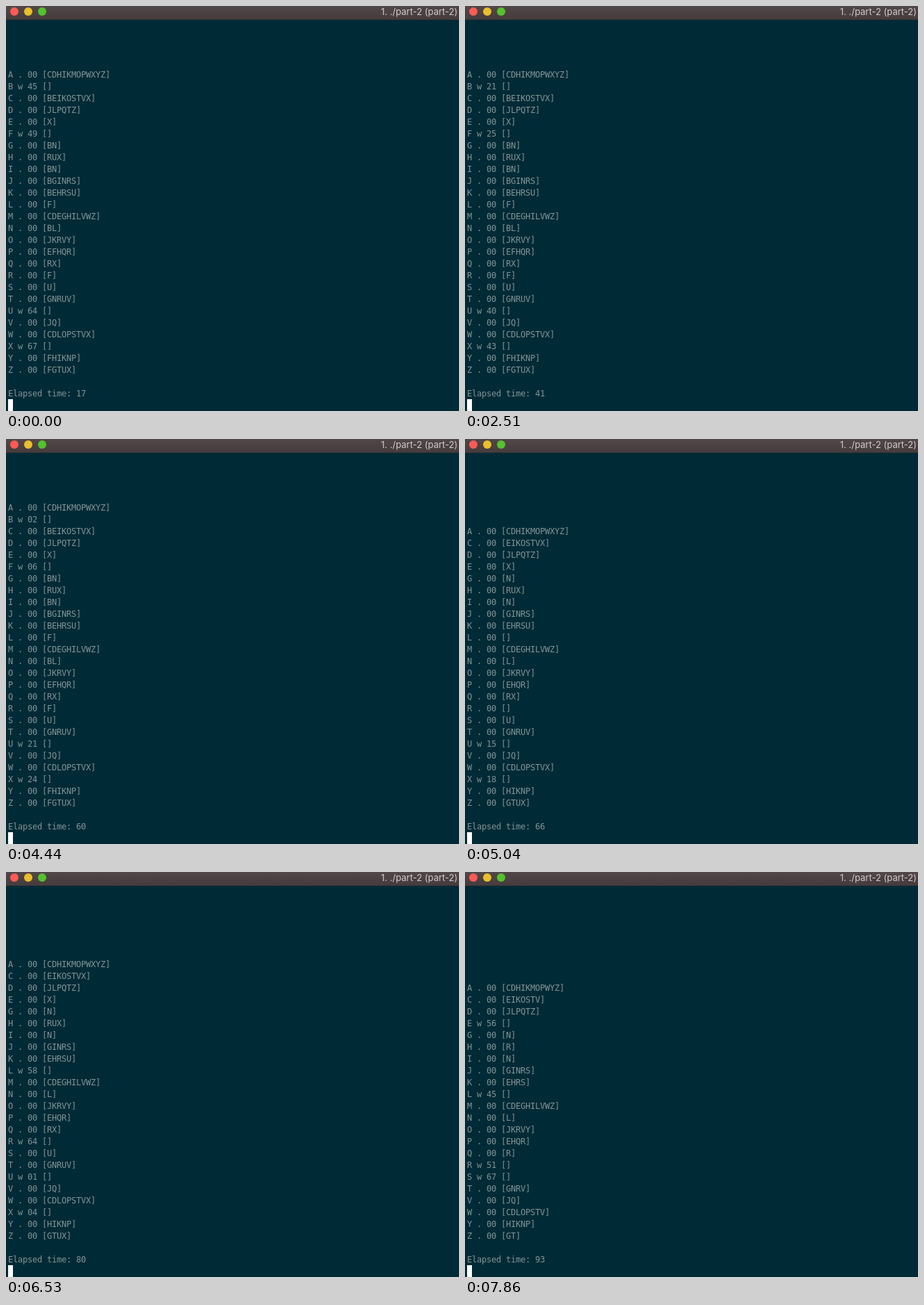
These frames come from a looping animation (652 px wide and 583 px high, 8 s). An HTML page with a canvas:

```html
<!DOCTYPE html>
<html lang="en">
<head>
<meta charset="utf-8">
<title>Terminal</title>
<style>
  html, body { margin: 0; width: 100%; height: 100%; overflow: hidden; background: #002b36; }
  canvas { display: block; }
</style>
</head>
<body>
<canvas id="stage" width="652" height="583"></canvas>
<script>
const ctx = document.getElementById('stage').getContext('2d');
const LOOP = 8000;
const CELL = 7, LINE = 17, LEFT = 3;
const LAST_TASK_Y = 528, STATUS_Y = 562;

// Prerequisites of each task, A to Z
const needs = Object.fromEntries(
  ('CDHIKMOPWXYZ,,BEIKOSTVX,JLPQTZ,X,,BN,RUX,BN,BGINRS,BEHRSU,F,CDEGHILVWZ,' +
   'BL,JKRVY,EFHQR,RX,F,U,GNRUV,,JQ,CDLOPSTVX,,FHIKNP,FGTUX')
    .split(',').map((list, i) => [String.fromCharCode(65 + i), list]));

// A task is ready once its prerequisites end; it then takes 61 ticks plus its index
const tasks = {};
function schedule(id) {
  if (!tasks[id]) {
    const ready = Math.max(0, ...[...needs[id]].map(n => schedule(n).end));
    tasks[id] = { ready, end: ready + 61 + id.charCodeAt(0) - 65 };
  }
  return tasks[id];
}
Object.keys(needs).forEach(schedule);

// The screen refreshes more slowly than the scheduler ticks
const shortSteps = new Set([0, 4, 8, 14, 20, 27, 36, 45, 50, 53]);
const refreshes = [0];
for (let k = 0; k < 53; k++) refreshes.push(refreshes[k] + (shortSteps.has(k) ? 140 : 150));

function tickAt(time) {
  const shown = refreshes.findLast(r => r <= time);
  return 17 + Math.floor((shown + 45) / 103.2);
}

function taskLine(id, tick) {
  const { ready, end } = tasks[id];
  const working = tick > ready;
  const left = String(working ? end - tick : 0).padStart(2, '0');
  const waiting = [...needs[id]].filter(n => tasks[n].end > tick).join('');
  return `${id} ${working ? 'w' : '.'} ${left} [${waiting}]`;
}

function print(text, y) {
  [...text].forEach((ch, i) => ctx.fillText(ch, LEFT + i * CELL, y));
}

function titleBar() {
  const shade = ctx.createLinearGradient(0, 0, 0, 20);
  shade.addColorStop(0, '#524748');
  shade.addColorStop(1, '#453b3c');
  ctx.fillStyle = shade;
  ctx.fillRect(0, 0, 652, 20);
  ctx.fillStyle = '#3a3638';
  ctx.fillRect(0, 19, 652, 1);
  ['#fc5b55', '#e9bf2a', '#54c22c'].forEach((color, i) => {
    ctx.fillStyle = color;
    ctx.beginPath();
    ctx.arc(12 + i * 20, 8, 6, 0, Math.PI * 2);
    ctx.fill();
  });
  ctx.font = '13px Inter, Roboto, sans-serif';
  ctx.textAlign = 'right';
  ctx.fillStyle = '#d0cbcb';
  ctx.fillText('1. ./part-2 (part-2)', 650, 13);
}

function draw(time) {
  const tick = tickAt(time);
  ctx.fillStyle = '#002b36';
  ctx.fillRect(0, 0, 652, 583);
  titleBar();

  ctx.font = '12px "DejaVu Sans Mono", monospace';
  ctx.textAlign = 'left';
  ctx.fillStyle = '#839496';
  const open = Object.keys(needs).filter(id => tasks[id].end > tick);
  open.forEach((id, i) => print(taskLine(id, tick), LAST_TASK_Y - (open.length - 1 - i) * LINE));
  print(`Elapsed time: ${tick}`, STATUS_Y);

  ctx.fillStyle = '#ffffff';
  ctx.fillRect(LEFT, 566, CELL, LINE);
}

const start = performance.now();
function loop() {
  draw((performance.now() - start) % LOOP);
  requestAnimationFrame(loop);
}
loop();
</script>
</body>
</html>
```
